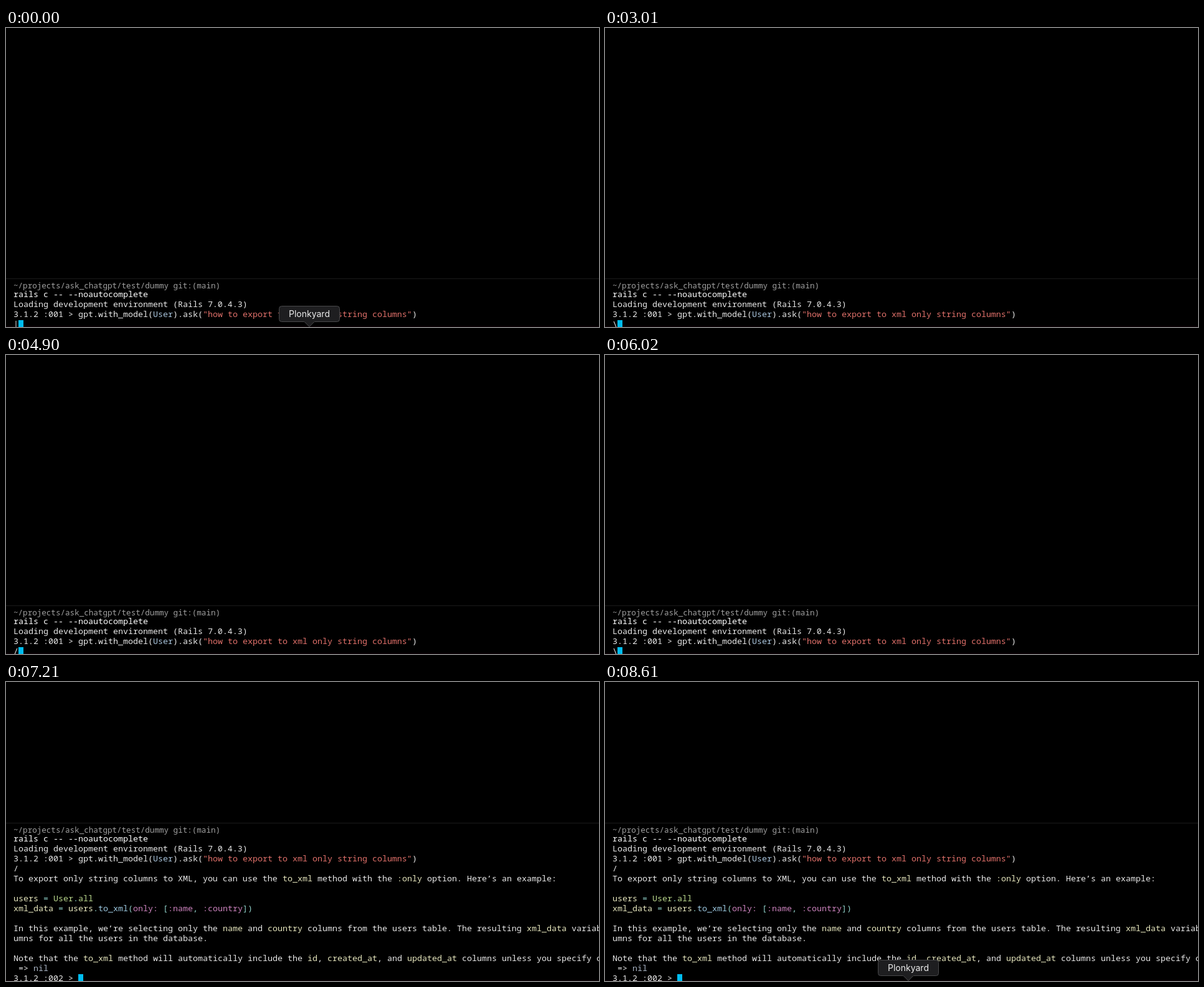
Animation of 952x480 px, one loop 8680 ms. Source, as an HTML page with a canvas:

```html
<!DOCTYPE html>
<html lang="en">
<head>
<meta charset="utf-8">
<title>Console answer</title>
<style>
html, body { margin: 0; width: 100%; height: 100%; overflow: hidden; background: #000; }
canvas { display: block; }
</style>
</head>
<body>
<canvas id="stage" width="952" height="480"></canvas>
<script>
const ctx = document.getElementById('stage').getContext('2d');
const LOOP = 8680, TICK = 70, ANSWER_AT = 7210;
const MONO = '"Noto Sans Mono", "DejaVu Sans Mono", monospace';

// "^x" inside a line switches to colour x
const COLORS = {
  w: '#e8e8e8', b: '#ffffff', g: '#a0a0a0', u: '#a9c4dc', r: '#e0706a',
  y: '#e6e6bd', l: '#b9d78c', t: '#8fd0c8', c: '#9cc8e0', p: '#cb82bd', n: '#a9b4c4'
};

const HEADER = [
  '^brails c -- --noautocomplete',
  'Loading development environment (Rails 7.0.4.3)',
  '3.1.2 :001 > gpt.with_model(^uUser^w).ask(^r"how to export to xml only string columns"^w)'
];

const ANSWER = [
  'To export only string columns to XML, you can use the ^yto_xml^w method with the ^y:only^w option. Here’s an example:',
  '',
  '^yusers ^t= ^lUser^t.^lall',
  '^yxml_data ^t= ^yusers^t.^cto_xml^t(^ponly: ^t[^p:name^t, ^p:country^t])',
  '',
  'In this example, we’re selecting only the ^yname^w and ^ycountry^w columns from the users table. The resulting ^yxml_data^w variable',
  'umns for all the users in the database.',
  '',
  'Note that the ^yto_xml^w method will automatically include the ^yid^w, ^ycreated_at^w, and ^yupdated_at^w columns unless you specify otherwise',
  ' => ^nnil',
  '3.1.2 :002 > '
];

function write(line, y, size = 13.333) {
  ctx.font = `${size}px ${MONO}`;
  ctx.textAlign = 'left';
  let x = 12;
  line.split('^').forEach((part, i) => {
    const text = i ? part.slice(1) : part;
    ctx.fillStyle = COLORS[i ? part[0] : 'w'];
    ctx.fillText(text, x, y + 4);
    x += text.length * size * 0.6;
  });
}

function tooltip(label, x, width) {
  const left = x - width / 2 + 0.5, right = left + width - 1;
  ctx.beginPath();
  ctx.roundRect(left, 446.5, right - left, 25, 4);
  ctx.fillStyle = '#1e1e20';
  ctx.strokeStyle = '#48484a';
  ctx.lineWidth = 1;
  ctx.fill();
  ctx.stroke();
  ctx.beginPath();
  ctx.moveTo(x - 9, 471);
  ctx.lineTo(x, 479.5);
  ctx.lineTo(x + 9, 471);
  ctx.fill();
  ctx.beginPath();
  ctx.moveTo(x - 8, 471.5);
  ctx.lineTo(x, 479.5);
  ctx.lineTo(x + 8, 471.5);
  ctx.stroke();
  ctx.font = '14px Inter, sans-serif';
  ctx.textAlign = 'center';
  ctx.fillStyle = '#ececec';
  ctx.fillText(label, x, 464);
}

function draw(t) {
  const done = t >= ANSWER_AT;
  const top = done ? 226 : 402;

  ctx.fillStyle = '#000';
  ctx.fillRect(0, 0, 952, 480);
  ctx.fillStyle = '#1b1b1b';
  ctx.fillRect(0, top, 952, 1);
  ctx.fillStyle = '#0a0206';
  ctx.fillRect(0, 478, 952, 2);

  write('^g~/projects/ask_chatgpt/test/dummy git:(main)', top + 12, 12.58);
  HEADER.forEach((line, i) => write(line, top + 26 + 16 * i));

  const turn = Math.floor(Math.max(0, t * 0.0092 - 0.06));
  write(done ? '/' : '|/-\\'[turn % 4], top + 74);
  if (done) ANSWER.forEach((line, i) => write(line, top + 90 + 16 * i));

  ctx.fillStyle = '#00bdf2';
  ctx.fillRect(done ? 116 : 20, 469, 8, 11);

  if (t < 70 || t >= 8610) tooltip('Plonkyard', 487, 98);
  else if (t >= 8120 && t < 8190) tooltip('Mertol', 788.5, 69);
}

function frame() {
  const t = performance.now() % LOOP;
  draw(Math.floor(t / TICK) * TICK);
  requestAnimationFrame(frame);
}
frame();
</script>
</body>
</html>
```
